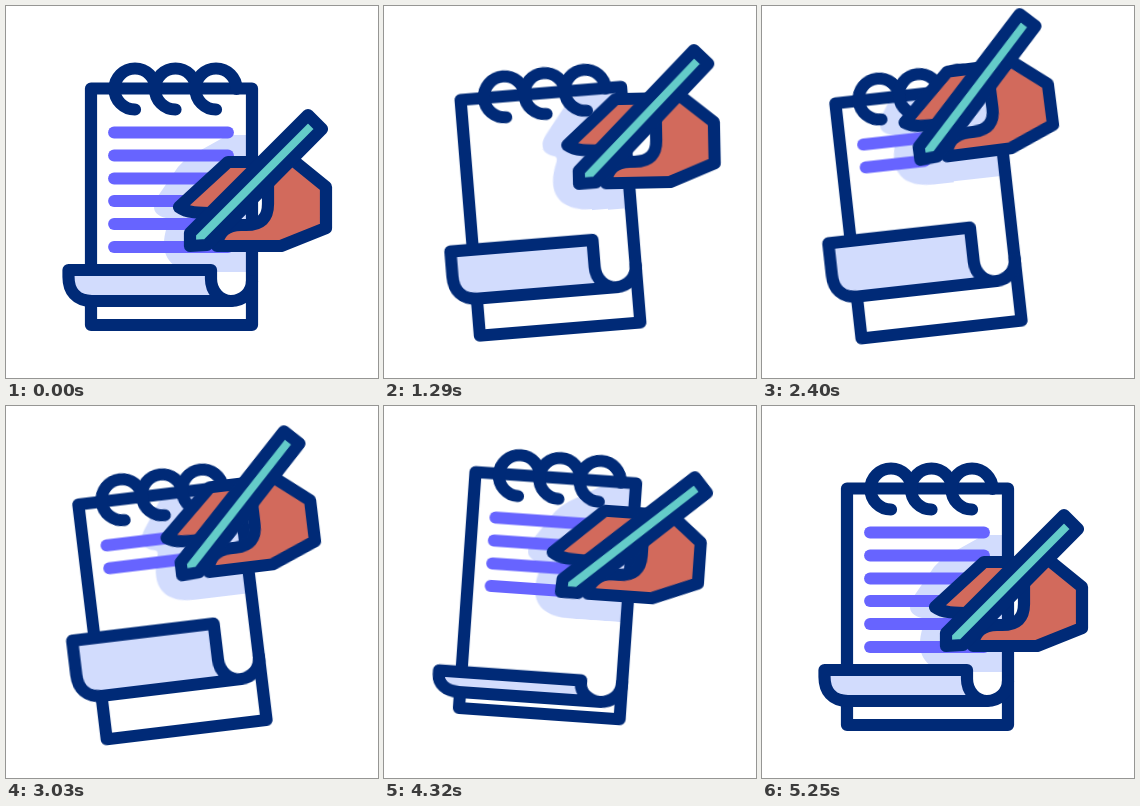
Recreate the animation shown at these times as an HTML page without scripts. Size 372 by 372 pixels, loop 5400 ms.

```html
<!DOCTYPE html>
<html lang="en">
<head>
<meta charset="utf-8">
<title>Writing on a notepad</title>
<style>
  html, body { margin: 0; width: 100%; height: 100%; overflow: hidden; background: #fff; }
  svg { display: block; width: 100vw; height: 100vh; }

  .ink { stroke: #002a77; stroke-width: 12.2; stroke-linecap: round; stroke-linejoin: round; }
  .paper { fill: #fff; }
  .tint { fill: #d2dcfd; }
  .skin { fill: #d26a5c; }
  .teal { fill: #64ccc9; }
  .bare { fill: none; }
  .text path {
    fill: none; stroke: #6764ff; stroke-width: 11.8; stroke-linecap: round;
    stroke-dasharray: 100 300;
  }

  .pad, .curl, .flap, .lift, .sweep, .pen, .text path {
    animation: 5.4s cubic-bezier(.37, 0, .63, 1) infinite;
  }
  .pad { animation-name: pad; transform-origin: 165.5px 201px; }
  .curl { animation-name: curl; }
  .flap { animation-name: flap; }
  .lift { animation-name: lift; }
  .sweep { animation-name: sweep; transform-origin: 184px 240px; }
  .pen { animation-name: pen; transform-origin: 184px 240px; }
  .text path:nth-child(1) { animation-name: line1; }
  .text path:nth-child(2) { animation-name: line2; }
  .text path:nth-child(3) { animation-name: line3; }
  .text path:nth-child(4) { animation-name: line4; }
  .text path:nth-child(5) { animation-name: line5; }
  .text path:nth-child(6) { animation-name: line6; }

  @keyframes pad {
    0%, 3.3%    { transform: translate(0, 0) rotate(0deg); }
    16.7%       { transform: translate(1px, 4.4px) rotate(-4.5deg); }
    57.4%       { transform: translate(1px, 5.5px) rotate(-6.9deg); }
    67.4%       { transform: translate(0, 6px) rotate(-6.9deg); }
    78.3%       { transform: translate(-2px, -11.3px) rotate(4.1deg); }
    97.2%, 100% { transform: translate(0, 0) rotate(0deg); }
  }

  /* the rolled sheet: its bottom slides while its height changes */
  @keyframes curl {
    0%, 3.3%    { transform: translateY(0); }
    16.7%       { transform: translateY(-12.6px); }
    57.4%       { transform: translateY(-19.7px); }
    67.4%       { transform: translateY(-21px); }
    78.3%       { transform: translateY(8.2px); }
    97.2%, 100% { transform: translateY(0); }
  }
  @keyframes flap {
    0%, 3.3%, 97.2%, 100% { d: path("M62.5 264H205V273C205 285 214 295 225 295H86C70 295 62.5 285 62.5 271Z"); }
    16.7% { d: path("M62.5 246.6H205V273C205 285 214 295 225 295H86C70 295 62.5 285 62.5 271Z"); }
    57.4% { d: path("M62.5 236.7H205V273C205 285 214 295 225 295H86C70 295 62.5 285 62.5 271Z"); }
    67.4% { d: path("M62.5 235H205V273C205 285 214 295 225 295H86C70 295 62.5 285 62.5 271Z"); }
    78.3% { d: path("M62.5 275H205V278C205 287 214 295 225 295H84C70 295 62.5 288 62.5 279Z"); }
  }

  /* hand: vertical and horizontal travel run on separate curves */
  @keyframes lift {
    0%, 3.3%      { transform: translateY(0); }
    36.1%, 51.5%  { transform: translateY(-92px); }
    62.8%, 87.4%  { transform: translateY(-44px); }
    97.2%, 100%   { transform: translateY(0); }
  }
  @keyframes sweep {
    0%, 3.3%    { transform: translateX(0) rotate(0deg); }
    19.3%       { transform: translateX(30px) rotate(4.6deg); }
    36.7%       { transform: translateX(-80px) rotate(-2deg); }
    51.5%       { transform: translateX(30px) rotate(0deg); }
    62.8%       { transform: translateX(-66px) rotate(0deg); animation-timing-function: ease-in; }
    69.4%       { transform: translateX(-43px) rotate(.4deg); animation-timing-function: linear; }
    80%         { transform: translateX(-5.5px) rotate(0deg); animation-timing-function: ease-out; }
    87.4%       { transform: translateX(22px) rotate(0deg); }
    97.2%, 100% { transform: translateX(0) rotate(0deg); }
  }
  @keyframes pen {
    0%, 3.3%    { transform: rotate(0deg); }
    19.3%       { transform: rotate(.6deg); }
    36.7%       { transform: rotate(-4.5deg); }
    51.5%       { transform: rotate(3deg); }
    62.8%       { transform: rotate(-5deg); }
    69.4%       { transform: rotate(-4.6deg); }
    80%, 87.4%  { transform: rotate(3.4deg); }
    97.2%, 100% { transform: rotate(0deg); }
  }

  /* lines shorten from the bottom up, then are written in pairs */
  @keyframes line1 {
    0%, 13.9%, 51.5%, 100% { stroke-dashoffset: 0; }
    25%, 36.7% { stroke-dashoffset: 104; }
  }
  @keyframes line2 {
    0%, 11.9%, 51.5%, 100% { stroke-dashoffset: 0; }
    23%, 36.7% { stroke-dashoffset: 104; }
  }
  @keyframes line3 {
    0%, 8%, 87.4%, 100% { stroke-dashoffset: 0; }
    19.2% { stroke-dashoffset: 104; }
    62.2% { stroke-dashoffset: 104; animation-timing-function: linear; }
  }
  @keyframes line4 {
    0%, 6%, 87.4%, 100% { stroke-dashoffset: 0; }
    17.1% { stroke-dashoffset: 104; }
    62.2% { stroke-dashoffset: 104; animation-timing-function: linear; }
  }
  @keyframes line5 {
    0%, 4.4%, 95.4%, 100% { stroke-dashoffset: 0; }
    15.5%, 85.2% { stroke-dashoffset: 104; }
  }
  @keyframes line6 {
    0%, 3.3%, 96.7%, 100% { stroke-dashoffset: 0; }
    13.3%, 87% { stroke-dashoffset: 104; }
  }
</style>
</head>
<body>
<svg viewBox="0 0 372 372" aria-label="A hand writing on a notepad">
  <defs>
    <clipPath id="page"><rect x="85" y="82.5" width="161" height="236.5"/></clipPath>
    <path id="ring" class="ink bare" d="M129 103.5A20.5 20.5 0 1 1 149.5 83"/>
  </defs>

  <g class="pad">
    <rect class="paper" x="85" y="82.5" width="161" height="236.5"/>

    <g clip-path="url(#page)">
      <g class="lift"><g class="sweep">
        <path class="tint" d="M222 129H290L320 160V245L275 266H195C170 266 158 255 158 238C158 222 166 214 160 212C147 209 145 201 152 190L172 161Q178 154 186 149Z"/>
      </g></g>
    </g>

    <g class="text">
      <path pathLength="100" d="M108 126.5H222"/>
      <path pathLength="100" d="M108 149.5H222"/>
      <path pathLength="100" d="M108 172.5H222"/>
      <path pathLength="100" d="M108 195H222"/>
      <path pathLength="100" d="M108 218H222"/>
      <path pathLength="100" d="M108 241H222"/>
    </g>

    <rect class="ink bare" x="85" y="82.5" width="161" height="236.5"/>
    <use href="#ring"/>
    <use href="#ring" x="40.5"/>
    <use href="#ring" x="81"/>

    <g class="curl">
      <path class="flap ink tint" d="M62.5 264H205V273C205 285 214 295 225 295H86C70 295 62.5 285 62.5 271Z"/>
      <path class="ink bare" d="M225 295C237 295 246 286 246 275"/>
    </g>

    <g class="lift"><g class="sweep">
      <path class="ink skin" d="M266 156H222L173 201C181 207 192 207 211 207Z"/>
      <path class="ink skin" d="M270 155H288L320 181V222L275 240H211C212 226 222 219 235 219H240C255 219 262 212 262 198V166Z"/>
      <path class="pen ink teal" d="M302 109L316 123L201 239L184 240V227Z"/>
    </g></g>
  </g>
</svg>
</body>
</html>
```
